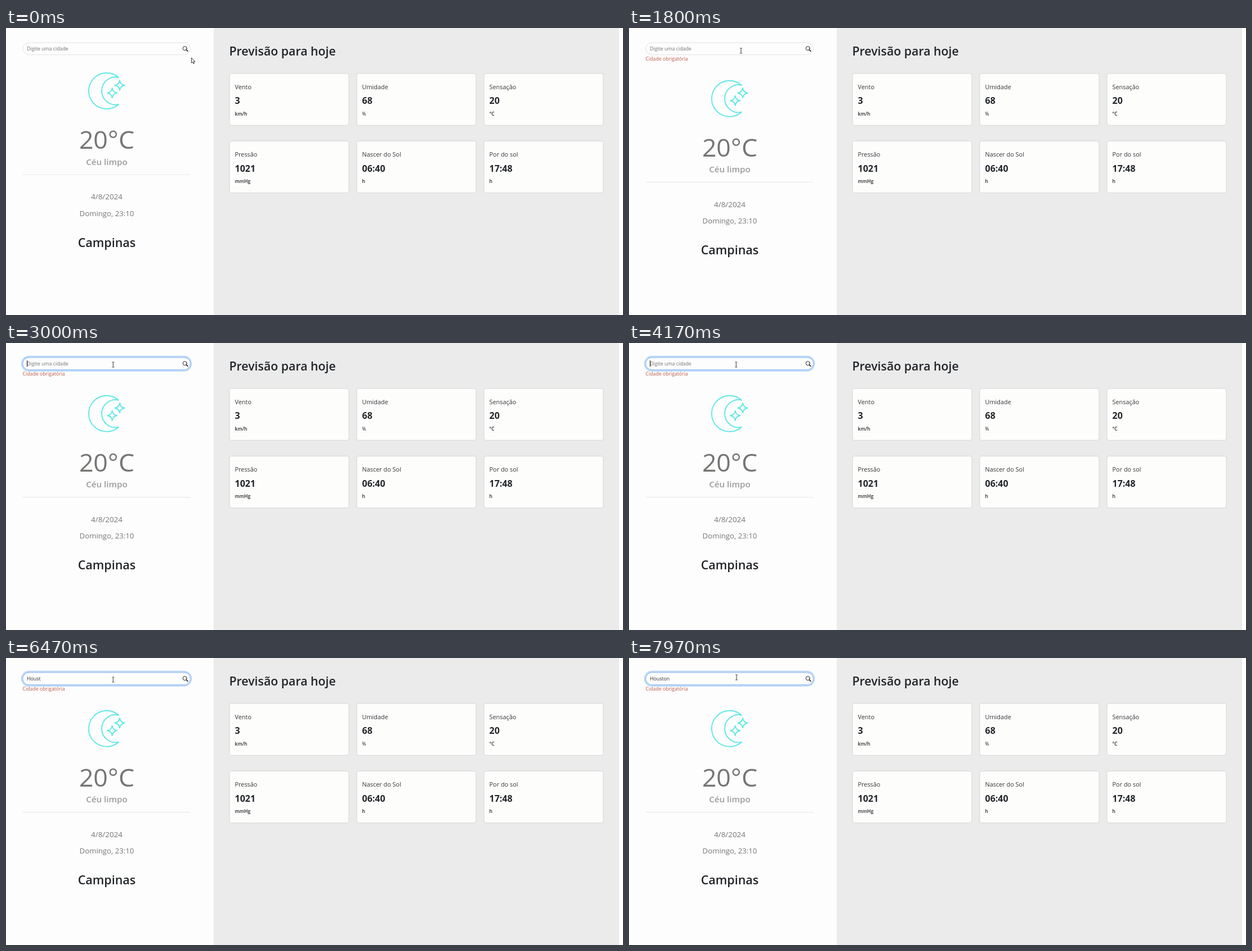
An HTML page that plays this animation: 1096x511 px, repeating every 8 s.

```html
<!DOCTYPE html>
<html lang="pt-BR">
<head>
<meta charset="utf-8">
<title>Previsão do tempo</title>
<style>
  html, body { margin: 0; width: 100%; height: 100%; overflow: hidden; background: #fff; }
  svg { display: block; font-family: "Open Sans", "Noto Sans", sans-serif; fill: #212529; }
  .line { fill: none; stroke-linecap: round; stroke-linejoin: round; }
  .semi { font-weight: 600; }
  .card { fill: #fdfdfc; stroke: #d6d6d4; }
  .label { font-size: 10.9px; fill: #343638; }
  .value { font-size: 16px; font-weight: 700; }
  .unit { font-size: 8.6px; font-weight: 600; }
  .pointer { fill: #fff; stroke: #222; stroke-width: .9; stroke-linejoin: round; }
</style>
</head>
<body>
<svg width="1096" height="511" viewBox="0 0 1096 511">
  <rect width="370" height="511" fill="#fdfdfd"/>
  <rect x="369" width="720" height="511" fill="#ebebeb"/>

  <rect id="ring" x="28.3" y="24.3" width="300.4" height="25" rx="12.5" fill="none" stroke="#b9d6f8" stroke-width="3"/>
  <rect id="field" x="29.8" y="26" width="297.6" height="21.6" rx="10.8" fill="#fdfdfd"/>
  <text id="query" x="37" y="40" font-size="8.8"></text>
  <rect id="caret" y="31" width="1" height="11.5" fill="#222"/>
  <g class="line" stroke="#222" stroke-width="1">
    <circle cx="317.7" cy="36.2" r="3.5"/>
    <path d="M320.4 38.9L322.9 41.4" stroke-width="1.5"/>
  </g>
  <text id="error" x="29.6" y="58" font-size="8.7" fill="#b95a48">Cidade obrigatória</text>

  <g id="now" text-anchor="middle">
    <g class="line" stroke="#62e8e3" stroke-width="1.9">
      <path d="M200 88A32 32 0 1 0 200 136A24.6 24.6 0 1 1 200 88Z"/>
      <path id="star" d="M202 93.3Q203.2 100.8 210.7 102Q203.2 103.2 202 110.7Q200.800 103.2 193.3 102Q200.800 100.800 202 93.3Z"/>
      <use href="#star" x="-13.4" y="13.6"/>
    </g>
    <text x="179" y="215" font-size="44.6" fill="#757573">20°C</text>
    <text x="179" y="243.500" font-size="15.2" class="semi" fill="#9b9b99">Céu limpo</text>
    <path d="M29.500 261H327.500" stroke="#e6e6ee"/>
    <text x="179" y="305" font-size="13.4" fill="#757573">4/8/2024</text>
    <text x="179" y="334.700" font-size="13.2" fill="#757573">Domingo, 23:10</text>
    <text x="179" y="389.700" font-size="21.500" class="semi">Campinas</text>
  </g>

  <text x="396.500" y="48.700" font-size="21.300" class="semi">Previsão para hoje</text>
  <g id="cards"></g>

  <g id="pointer" class="pointer">
    <path id="arrow" d="M0 0V9.300L2.100 7.400L3.600 10.800L5 10.200L3.500 6.900H6.400Z"/>
    <path id="hand" d="M-1 7.500V1Q-1 0 0 0T1 1V5Q2 4.200 2.800 5.300Q3.800 4.600 4.600 5.800Q6.200 5.400 6.200 7V9.500Q6.200 11 5.200 13H.2Q-.8 10.800 -3 8.500Q-3.400 7 -2 7Z"/>
    <path id="beam" d="M-2 -4.500H-.6L0 -4L.6 -4.500H2M0 -4V4M-2 4.500H-.6L0 4L.6 4.500H2" fill="none"/>
  </g>
</svg>
<script>
const LOOP = 8000, ERROR_AT = 930, FOCUS_AT = 1900, BLINK = 530;
const CITY = "Houston";
const KEY_TIMES = [5070, 5250, 5430, 5650, 5850, 6880, 7080];
// Pointer path: time, x, y
const PATH = [
  [0, 329.500, 53], [100, 329.500, 53], [500, 318.500, 37.500], [1150, 318.500, 37.500],
  [1650, 199, 40.500], [1800, 199, 40.500], [1900, 190.300, 38.500],
  [7550, 190.300, 38.500], [7850, 191, 34.500], [LOOP, 191, 34.500]
];
const CARDS = [
  ["Vento", "3", "km/h"], ["Umidade", "68", "%"], ["Sensação", "20", "°C"],
  ["Pressão", "1021", "mmHg"], ["Nascer do Sol", "06:40", "h"], ["Por do sol", "17:48", "h"]
];

const el = id => document.getElementById(id);
const show = (id, on) => el(id).setAttribute("visibility", on ? "visible" : "hidden");

el("cards").innerHTML = CARDS.map(([label, value, unit], i) => `
  <g transform="translate(${397 + i % 3 * 226} ${81 + Math.floor(i / 3) * 120.300})">
    <rect class="card" width="212" height="92.300" rx="3.500"/>
    <text class="label" x="9.500" y="27.500">${label}</text>
    <text class="value" x="9.500" y="54.300">${value}</text>
    <text class="unit" x="9.500" y="75"${unit === "%" ? ' style="font-weight:400"' : ""}>${unit}</text>
  </g>`).join("");

function pointerAt(t) {
  const i = PATH.findIndex(p => p[0] > t);
  const [t0, x0, y0] = PATH[i - 1], [t1, x1, y1] = PATH[i];
  const k = (t - t0) / (t1 - t0), e = k * k * (3 - 2 * k);
  return [x0 + (x1 - x0) * e, y0 + (y1 - y0) * e];
}

function draw(t) {
  const failed = t >= ERROR_AT, focused = t >= FOCUS_AT;
  show("error", failed);
  el("now").setAttribute("transform", `translate(0 ${failed ? 13.700 : 0})`);

  const glow = Math.min(1, Math.max(0, (t - FOCUS_AT) / 150));
  el("ring").setAttribute("opacity", glow);
  el("field").setAttribute("stroke", focused ? "#8fbcf3" : "#e0e1ea");

  const typed = KEY_TIMES.filter(k => k <= t).length;
  const query = el("query");
  query.textContent = typed ? CITY.slice(0, typed) : "Digite uma cidade";
  query.setAttribute("fill", typed ? "#2b2f33" : "#6f7274");

  const since = t - (typed ? KEY_TIMES[typed - 1] : FOCUS_AT);
  show("caret", focused && since % (2 * BLINK) < BLINK);
  el("caret").setAttribute("x", 37 + (typed ? query.getComputedTextLength() : 0));

  const [x, y] = pointerAt(t);
  const shape = y > 47.500 ? "arrow" : x > 312 ? "hand" : "beam";
  for (const id of ["arrow", "hand", "beam"]) show(id, id === shape);
  el("pointer").setAttribute("transform", `translate(${x} ${y})`);
}

const start = performance.now();
function frame() {
  draw((performance.now() - start) % LOOP);
  requestAnimationFrame(frame);
}
frame();
</script>
</body>
</html>
```
